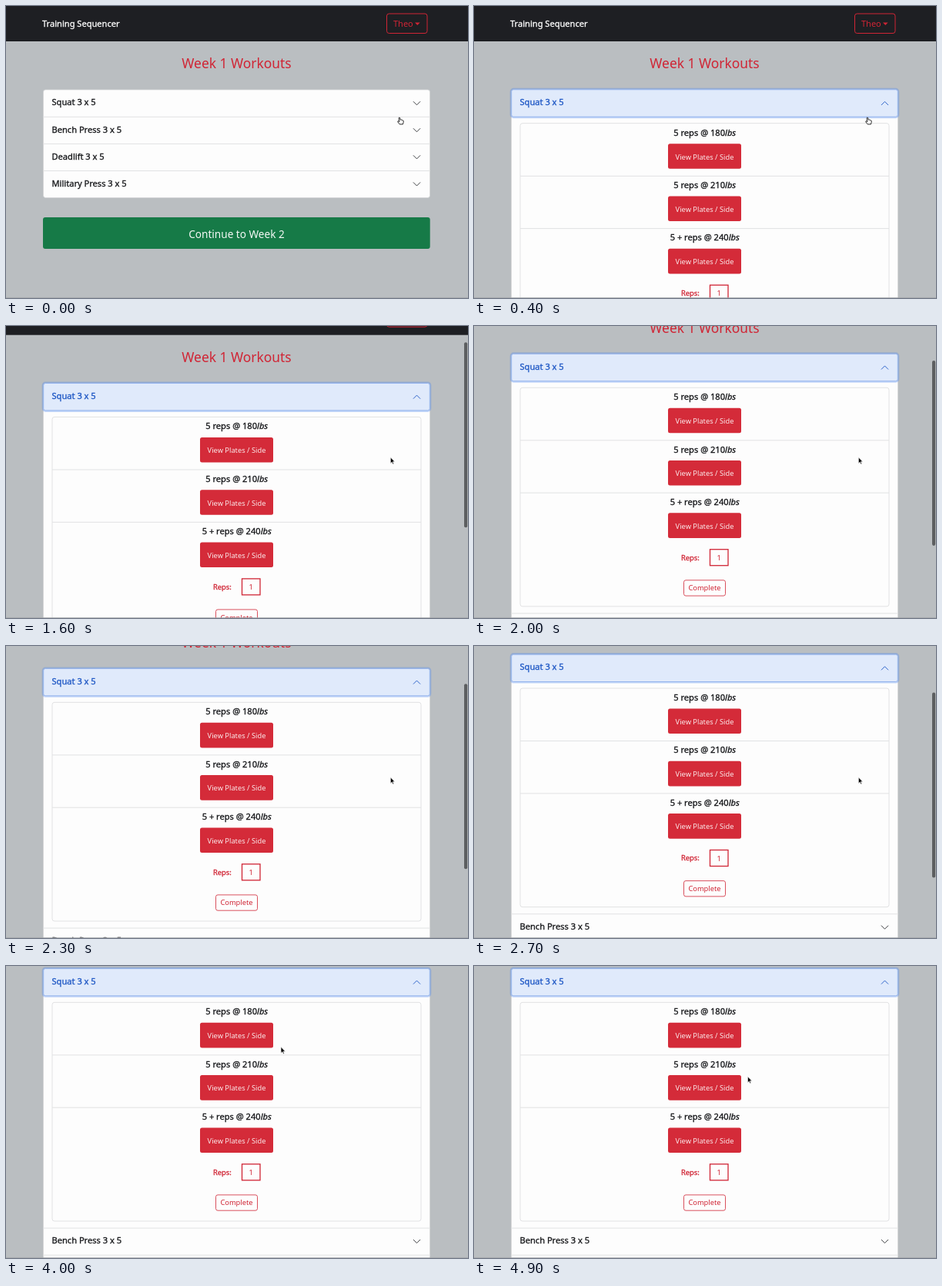
Write an HTML page that moves like this. It is 600x380 px and loops after 5000 ms.

```html
<!DOCTYPE html>
<html lang="en">
<head>
<meta charset="utf-8">
<title>Week 1 Workouts</title>
<style>
  html, body { margin: 0; width: 100%; height: 100%; overflow: hidden; background: #babec1; }
  svg { display: block; width: 100%; height: 100%; }
  text { font-family: "Noto Sans", "Open Sans", sans-serif; white-space: pre; }
  .item { font-size: 11.1px; color: #16171a; }
  .medium { fill: currentColor; stroke: currentColor; stroke-width: .32; }
  .small { font-size: 9.3px; }
  .mid { text-anchor: middle; }
  .red { color: #d02535; fill: #d02535; }
  .outline { fill: none; stroke: #d02535; }
  .rule { stroke: #e1e2e3; stroke-width: 1; fill: none; }
  .chevron { fill: none; stroke: #2a2c2f; stroke-width: .9; stroke-linecap: round; stroke-linejoin: round; }
</style>
</head>
<body>
<svg viewBox="0 0 600 380" preserveAspectRatio="none">
  <defs>
    <clipPath id="bodyClip"><rect id="bodyWindow" x="40" y="144.5" width="520" height="0"/></clipPath>
  </defs>
  <rect width="600" height="380" fill="#babec1"/>
  <g id="page">
    <rect width="600" height="46" fill="#1e1f23"/>
    <text x="47" y="27" class="item medium" style="color:#fff">Training Sequencer</text>
    <rect x="494.5" y="10" width="52.5" height="25.5" rx="3" class="outline"/>
    <text x="503" y="27" class="red" font-size="11">Theo</text>
    <path d="M531 21.5h6.6l-3.3 3.5z" class="red"/>
    <text x="299.5" y="81" class="mid red" font-size="17.4">Week 1 Workouts</text>

    <rect id="card" x="48.5" y="109" width="502" height="140.5" rx="3" fill="#fdfdfd" stroke="#d3d5d6" stroke-width=".7"/>
    <g clip-path="url(#bodyClip)"><g id="sets"></g></g>
    <g id="lower">
      <g id="rows"></g>
      <rect x="48" y="275" width="502.7" height="41" rx="3" fill="#167a47"/>
      <text x="299.5" y="301.5" class="mid" font-size="13.6" fill="#f4f8f5">Continue to Week 2</text>
    </g>
    <g id="focus">
      <rect x="47.8" y="107.9" width="503.4" height="37.2" rx="3.5" fill="none" stroke="#3f7fee" stroke-opacity=".3" stroke-width="2.2"/>
      <rect x="48.7" y="108.8" width="501.6" height="35.4" rx="2.5" fill="#e0eafb" stroke="#93b3ec" stroke-width="1"/>
    </g>
    <text id="squat" x="59.5" y="129.2" class="item medium">Squat 3 x 5</text>
    <path id="squatArrow" class="chevron" d="M-4.3 -2.1L0 2.2L4.3 -2.1"/>
  </g>
  <rect id="thumb" x="595" width="4.2" height="241" rx="2.1" fill="#5c5e60"/>
  <rect y="379" width="600" height="1" fill="#a3a6a8" opacity=".7"/>
  <path id="arrow" d="M0 0V8.1L1.9 6.4L3.1 9.1L4.4 8.5L3.2 5.9H5.7Z" fill="#000" stroke="#fff" stroke-width=".7" stroke-linejoin="round"/>
  <path id="hand" d="M-1.9 -3.9Q-1.1 -5 -.3 -3.9L.2 -1.3L1.5 -1.5L2.6 -1L3.7 -.6Q4.5 .2 4.1 2L3.4 4.4H-.8L-3.3 1.2Q-3.5 .1 -2.4 .3L-1.2 1.2Z" fill="#fff" stroke="#111" stroke-width=".9" stroke-linejoin="round"/>
</svg>
<script>
const LOOP = 5000, STEP = 100, BODY_HEIGHT = 302.2;
const $ = id => document.getElementById(id);
const set = (id, name, value) => $(id).setAttribute(name, value);

const weights = ["5 reps @ 180", "5 reps @ 210", "5 + reps @ 240"];
const setRow = (label, i) => {
  const y = 153 + i * 68.3;
  return `${i ? `<path class="rule" d="M60 ${y}H539"/>` : ""}
    <text x="299.7" y="${y + 15.8}" class="item medium mid">${label}<tspan font-style="italic">lbs</tspan></text>
    <rect x="252" y="${y + 26.2}" width="95" height="32.6" rx="2.5" fill="#d42b39"/>
    <text x="299.5" y="${y + 46.6}" class="small mid" fill="#fbe9ea">View Plates / Side</text>`;
};
$("sets").innerHTML = `<rect x="60" y="152.7" width="479" height="284.7" rx="3" class="rule"/>
  ${weights.map(setRow).join("")}
  <text x="269" y="377" class="small medium red">Reps:</text>
  <rect x="306.5" y="363.2" width="23.5" height="21" class="outline" stroke-width="1.3"/>
  <text x="318.2" y="377.4" class="small mid red">1</text>
  <rect x="272.5" y="403.3" width="54" height="20.3" rx="2.5" class="outline" stroke-width=".8"/>
  <text x="299.5" y="416.9" class="small mid red">Complete</text>`;

$("rows").innerHTML = ["Bench Press", "Deadlift", "Military Press"].map((name, i) => {
  const y = 144.3 + i * 35.1;
  return `<path class="rule" d="M48.5 ${y}H550.5"/>
    <text x="59.5" y="${y + 20.4}" class="item medium">${name} 3 x 5</text>
    <path class="chevron" d="M529.2 ${y + 15.2}l4.3 4.3l4.3 -4.3"/>`;
}).join("");

const progress = (t, from, to) => Math.min(1, Math.max(0, (t - from) / (to - from)));
const smooth = p => p * p * (3 - 2 * p);
const easeOut = p => 1 - (1 - p) ** 3;

const moves = [
  { from: 900, to: 1000, dx: -4.3, dy: 1.5 },
  { from: 1000, to: 1200, dx: -8.4, dy: 19.8 },
  { from: 3100, to: 3500, dx: -142.3, dy: -65.5 },
  { from: 4300, to: 4900, dx: -1.6, dy: 38.5 }
];

function cursorAt(t) {
  let x = 512, y = 149.5;
  for (const m of moves) {
    const p = smooth(progress(t, m.from, m.to));
    x += m.dx * p;
    y += m.dy * p;
  }
  return `translate(${x} ${y})`;
}

function draw(t) {
  const grown = BODY_HEIGHT * smooth(progress(t, 100, 500));
  // Two flicks of the trackpad
  const offset = 79.4 * smooth(progress(t, 1100, 2200)) + 26 * easeOut(progress(t, 2500, 3100));
  const accent = t >= 100 ? "#1c56c4" : "";
  set("bodyWindow", "height", grown);
  set("card", "height", 140.5 + grown);
  set("lower", "transform", `translate(0 ${grown})`);
  set("focus", "opacity", progress(t, 0, 200));
  $("squat").style.color = accent;
  $("squatArrow").style.stroke = accent;
  set("squatArrow", "transform", `translate(533.5 126.6) rotate(${-180 * progress(t, 100, 300)})`);
  set("page", "transform", `translate(0 ${-offset})`);
  set("thumb", "y", offset * .62);
  set("thumb", "opacity", progress(t, 1100, 1300) * (1 - smooth(progress(t, 3350, 3700))));

  const place = cursorAt(t), pointing = t < 1100;
  set("hand", "transform", place);
  set("arrow", "transform", place);
  set("hand", "visibility", pointing ? "visible" : "hidden");
  set("arrow", "visibility", pointing ? "hidden" : "visible");
}

const start = performance.now();
function tick() {
  const t = (performance.now() - start) % LOOP;
  draw(Math.floor(t / STEP) * STEP);
  requestAnimationFrame(tick);
}
tick();
</script>
</body>
</html>
```
